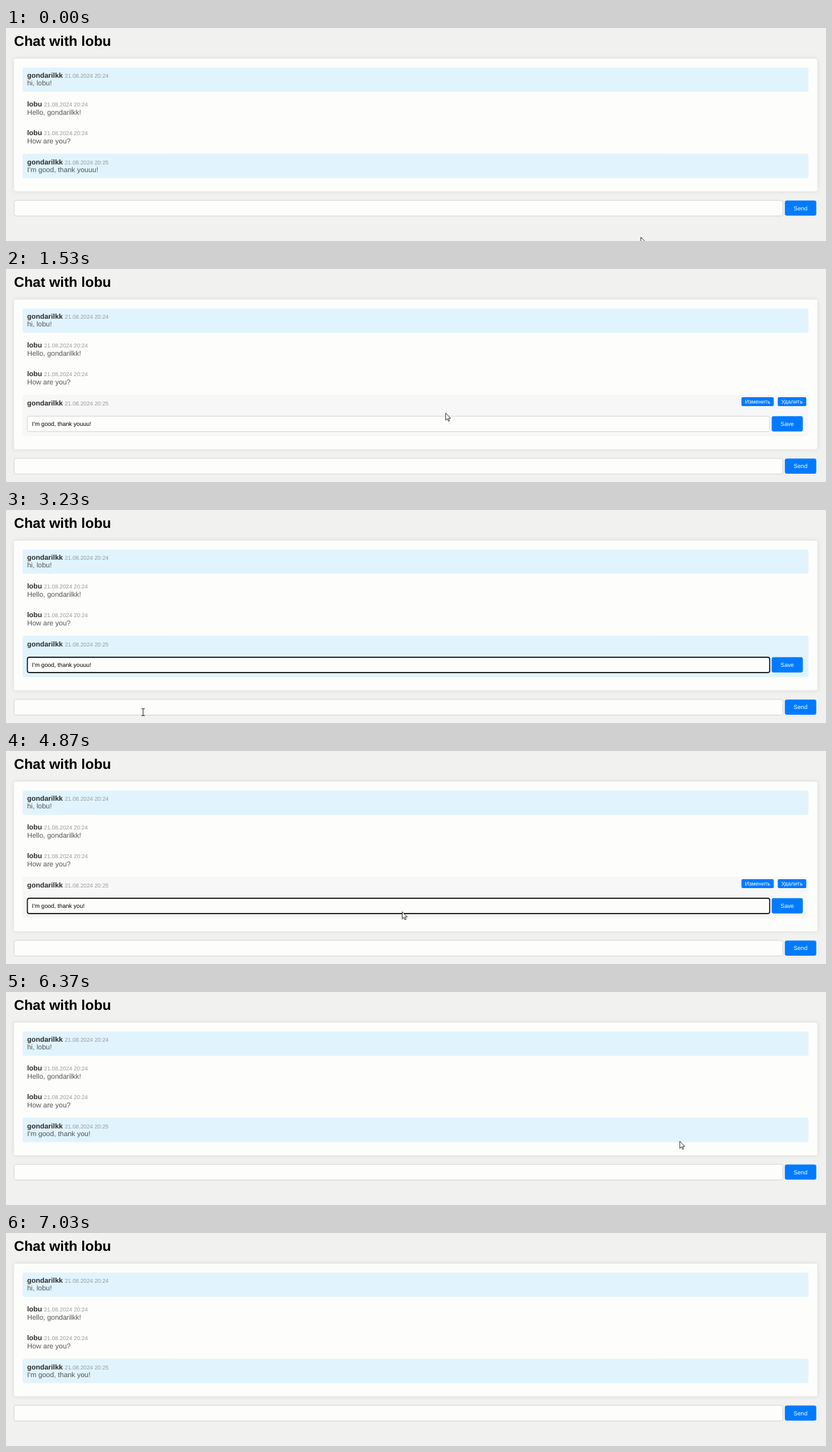
An HTML page that plays this animation: 1280 px wide and 334 px high, repeating every 7.96 s.

```html
<!DOCTYPE html>
<html lang="en">
<head>
<meta charset="utf-8">
<title>Chat</title>
<style>
  html, body { margin: 0; width: 100%; height: 100%; overflow: hidden; background: #f1f1ef; }
  svg { display: block; width: 100%; height: 100%; font: 11px "Liberation Sans", Arial, sans-serif; text-rendering: geometricPrecision; }
  .title { font-size: 22px; font-weight: bold; }
  .name { font-weight: bold; fill: #2b2b2b; }
  .time { font-size: 8.8px; fill: #999; }
  .msg { fill: #555; }
  .own { fill: #e1f4fd; }
  .own.hover { fill: #f7f7f7; }
  .panel { fill: #fdfdfb; filter: drop-shadow(0 0 3.4px rgba(0, 0, 0, .1)); }
  .field { fill: #fdfdfb; stroke: #ccc; stroke-width: .8; }
  .field.focus { stroke: #101010; stroke-width: 1.6; }
  .button rect { fill: #007bff; }
  .button.hover rect { fill: #0056b3; }
  .button text { fill: #fff; font-size: 9.16px; text-anchor: middle; }
  .button.small text { font-size: 8.8px; }
  #cursor path { fill: #fff; stroke: #000; stroke-width: .8; stroke-linejoin: round; }
  #cursor #beam { fill: none; stroke: #222; stroke-width: 1; }
</style>
</head>
<body>
<svg id="stage" viewBox="0 0 1280 334"></svg>
<script>
const LOOP = 7960, EDIT = 1270, FOCUS = 2600, BLUR = 5730, SAVED = 6000, GONE = 7000;
const ROW = 45.2, GROW = 26.7;

// Pointer path: time, x, y
const path = [
  [0, 991, 328], [30, 991, 328], [250, 1060, 275], [500, 1130, 230], [800, 1164, 205],
  [830, 1164, 203], [1270, 1164, 203], [1600, 560, 232], [1850, 200, 240], [2030, 128, 240],
  [2200, 128, 240], [2300, 132, 241], [3000, 132, 241], [3120, 180, 300], [3200, 216, 320],
  [3230, 214, 317], [4730, 214, 317], [4870, 617, 252], [5100, 960, 246], [5470, 1218, 243],
  [6000, 1218, 243], [6370, 1052, 234], [6630, 1000, 240], [LOOP, 1000, 240]
];

const rect = (x, y, w, h, cls, id = '', r = 3) =>
  `<rect id="${id}" class="${cls}" x="${x}" y="${y}" width="${w}" height="${h}" rx="${r}"/>`;

const button = (id, x, y, w, h, label, cls = '') =>
  `<g id="${id}" class="button ${cls}">${rect(x, y, w, h, '', '', cls ? 2 : 3)}
    <text x="${x + w / 2}" y="${y + h / 2 + 3.2}">${label}</text></g>`;

const message = (i, name, time, text, id = '') =>
  `<text x="33" y="${78 + i * ROW}"><tspan class="name">${name}</tspan> <tspan class="time">21.08.2024 ${time}</tspan></text>
   <text id="${id}" class="msg" x="33" y="${90.4 + i * ROW}">${text}</text>`;

document.getElementById('stage').innerHTML = `
  <text class="title" x="12.5" y="27.5">Chat with lobu</text>
  ${rect(12.5, 48, 1254, 208, 'panel', 'panel')}
  ${rect(26, 62, 1226.5, 38, 'own')}
  ${rect(26, 197.3, 1226.5, 38.2, 'own', 'row')}
  ${message(0, 'gondarilkk', '20:24', 'hi, lobu!')}
  ${message(1, 'lobu', '20:24', 'Hello, gondarilkk!')}
  ${message(2, 'lobu', '20:24', 'How are you?')}
  ${message(3, 'gondarilkk', '20:25', '', 'last')}
  <g id="tools">
    ${button('change', 1148, 201, 50.5, 14, 'Изменить', 'small')}
    ${button('remove', 1204.7, 201, 44.5, 14, 'Удалить', 'small')}
  </g>
  <g id="editor">
    ${rect(33.4, 230.9, 1158.7, 24, 'field', 'edit')}
    <text id="value" x="40.6" y="245.8" font-size="9.16"></text>
    ${button('save', 1195.2, 230.7, 48.6, 24, 'Save')}
  </g>
  <g id="footer">
    ${rect(12.7, 270.2, 1200, 24.6, 'field')}
    ${button('send', 1215.8, 270.5, 49, 23.8, 'Send')}
  </g>
  <g id="cursor">
    <path id="arrow" d="M0 0V11.2L2.6 8.8 4.3 12.7 6 12 4.3 8.2H7.8Z"/>
    <path id="beam" d="M-2.5 -5.5H-.8L0 -5 .8 -5.5H2.5M0 -5V5M-2.5 5.5H-.8L0 5 .8 5.5H2.5"/>
    <path id="hand" d="M-1.2 8V.6Q0 -1 1.2 .6V5Q2.6 4.2 3.6 5.4 5 4.8 5.8 6 7.3 5.8 7.5 7.3V10.5Q7.3 12.5 6.2 15H-.6Q-1.5 12.5 -4.2 9.4 -4.6 7.5 -2.8 7.6Z"/>
  </g>`;

const el = id => document.getElementById(id);
const show = (id, on) => el(id).setAttribute('display', on ? 'inline' : 'none');
const inside = ([x, y], left, top, right, bottom) => x >= left && x < right && y >= top && y < bottom;

function pointer(t) {
  const i = path.findIndex(p => p[0] > t);
  const [t0, x0, y0] = path[i - 1], [t1, x1, y1] = path[i];
  const k = (t - t0) / (t1 - t0);
  return [x0 + (x1 - x0) * k, y0 + (y1 - y0) * k];
}

function draw(now) {
  const t = now % LOOP;
  const p = pointer(t);
  const editing = t >= EDIT && t < SAVED;
  const shift = editing ? GROW : 0;
  const text = `I'm good, thank yo${'u'.repeat(t < 3800 ? 3 : t < 4330 ? 2 : 1)}!`;

  const onRow = t < GONE && inside(p, 26, 197, 1252, 234 + shift);
  const onChange = onRow && inside(p, 1148, 201, 1198.5, 215);
  const onSave = editing && inside(p, 1195, 231, 1244, 255);
  const onField = inside(p, 12, 270 + shift, 1213, 295 + shift) ||
    (editing && inside(p, 33, 231, 1192, 251));

  el('panel').setAttribute('height', 208 + shift);
  el('row').setAttribute('height', 38.2 + shift);
  el('footer').setAttribute('transform', `translate(0 ${shift})`);
  el('row').classList.toggle('hover', onRow);
  el('change').classList.toggle('hover', onChange);
  el('save').classList.toggle('hover', onSave);
  el('edit').classList.toggle('focus', t >= FOCUS && t < BLUR);
  el('last').textContent = editing ? '' : text;
  el('value').textContent = text;
  show('tools', onRow);
  show('editor', editing);

  const shape = onChange || onSave ? 'hand' : onField ? 'beam' : 'arrow';
  for (const id of ['arrow', 'beam', 'hand']) show(id, id === shape);
  show('cursor', t < GONE);
  el('cursor').setAttribute('transform', `translate(${p})`);
}

const start = performance.now();
function tick() {
  draw(performance.now() - start);
  requestAnimationFrame(tick);
}
tick();
</script>
</body>
</html>
```
